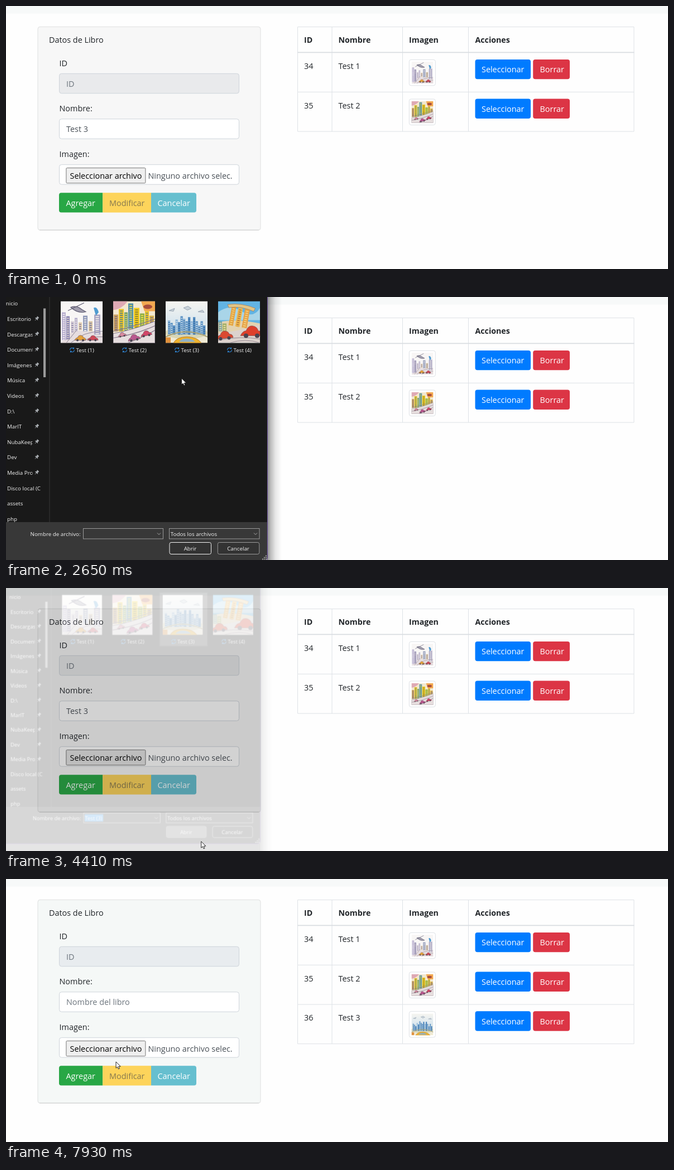
Write an HTML page that moves like this. It is 1186x472 px and loops after 8000 ms.

```html
<!DOCTYPE html>
<html lang="es">
<head>
<meta charset="utf-8">
<style>
html, body { margin: 0; width: 100%; height: 100%; overflow: hidden; background: #fefefe; }
svg { display: block; }
text { font: 14.4px "Open Sans", "Noto Sans", sans-serif; fill: #212529; white-space: pre; }
.head { font-weight: 700; font-size: 14.2px; }
.soft { fill: #6c757d; }
.field { fill: #495057; }
.w { fill: #fff; }
.small text { font-size: 9.8px; fill: #f2f2f2; }
</style>
</head>
<body>
<svg id="stage" width="100%" height="100%" viewBox="0 0 1186 472"></svg>
<script>
const LOOP = 8000;
const OPEN = 2050, CLOSE = 4250, PICKED = 4480, CLICK = 5980, SAVED = 6250;

const rect = (x, y, w, h, fill, more = '') =>
  `<rect x="${x}" y="${y}" width="${w}" height="${h}" fill="${fill}" ${more}/>`;
const text = (x, y, s, cls = '', more = '') =>
  `<text x="${x}" y="${y}" class="${cls}" ${more}>${s}</text>`;
const path = (d, stroke, width = 1, fill = 'none', more = '') =>
  `<path d="${d}" stroke="${stroke}" stroke-width="${width}" fill="${fill}" ${more}/>`;
const group = (id, body, more = '') => `<g id="${id}" ${more}>${body}</g>`;
const pic = (n, x, y, size) => `<use href="#pic${n}" x="${x}" y="${y}" width="${size}" height="${size}"/>`;

// City drawings, each in a 75 unit square
const tower = (x, y, w, h, fill, win) =>
  rect(x, y, w, h, fill) +
  path(`M${x + w / 2} ${y + 3}V${y + h}`, win, w * 0.55, 'none', 'stroke-dasharray="1.6 2.2"');
const car = (x, y, w, fill) =>
  path(`M${x} ${y}q${w * .1}-${w * .22} ${w * .25}-${w * .22}q${w * .1}-${w * .25} ${w * .3}-${w * .22}t${w * .25} ${w * .22}q${w * .2} 0 ${w * .2} ${w * .22}z`, '#6a4a52', .6, fill) +
  `<circle cx="${x + w * .25}" cy="${y}" r="${w * .1}" fill="#4a4450"/><circle cx="${x + w * .75}" cy="${y}" r="${w * .1}" fill="#4a4450"/>`;
const tilt = (deg, body) => `<g transform="rotate(${deg} 37 37)">${body}</g>`;

const drawings = [
  rect(0, 0, 75, 75, '#f8f6f5') +
  path('M0 75L22 52L75 56V75z', 'none', 0, '#e6dddf') +
  tower(2, 20, 7, 50, '#b9b0cf', '#f3eef2') + tower(10, 27, 6, 42, '#8b85b3', '#efe3d0') +
  tower(18, 36, 6, 20, '#d9d0d8', '#8f88ab') + tower(25, 30, 5, 24, '#b5aecb', '#f5eee6') +
  tower(32, 38, 6, 14, '#e3cfae', '#857fa6') +
  tower(40, 26, 8, 28, '#8f99b8', '#f2efee') + tower(50, 36, 7, 18, '#d8c3a2', '#7e7fa3') +
  tower(60, 24, 11, 36, '#aaa6c4', '#f7f2ec') +
  path('M13 17L42 3M18 11q10-4 20 4l7 4q-14 4-27-8z', '#5d5a70', 1.2, '#a29fae') +
  path('M59 12q6-3 9 8l-5 6z', 'none', 0, '#4f9bd0') +
  path('M10 75L30 50M18 75Q40 54 75 54M34 75Q54 62 75 64', '#8e8494', 1) +
  car(25, 70, 20, '#e3a23c') + car(48, 70, 19, '#cf4a5a'),

  rect(0, 0, 75, 75, '#f3e8cf') + path('M0 0H26Q16 14 0 16z', 'none', 0, '#dfa9b4') +
  path('M50 0H75V18H56z', 'none', 0, '#f2a850') +
  tower(1, 24, 8, 30, '#c9a05f', '#7a6c80') + tower(10, 14, 9, 40, '#e8c326', '#55808f') +
  tower(20, 20, 6, 34, '#73a06c', '#e8dc7a') +
  tower(27, 4, 9, 46, '#4f8fa8', '#e8d446') + tower(37, 12, 10, 36, '#f0cb1e', '#837832') +
  tower(48, 22, 8, 26, '#8fb043', '#f3dd53') + tower(57, 18, 7, 28, '#e9c522', '#6b7c94') +
  tower(65, 26, 8, 18, '#d3b04a', '#7b6a86') +
  '<ellipse cx="62" cy="10" rx="8" ry="4" fill="#a84d3c"/>' +
  path('M0 58Q34 52 75 36V75H0z', '#7f7488', 1, '#e6dede') +
  path('M0 54Q35 46 75 32M0 66Q40 60 75 44M26 75Q52 66 75 52', '#84768a', 1.2) +
  tilt(-12, car(4, 58, 15, '#d98aa0') + car(20, 69, 22, '#b9578f') + car(44, 66, 20, '#d24568')),

  rect(0, 0, 75, 75, 'url(#haze)') +
  path('M6 17l10-4l-2 5zM32 12l8-3l6 4l-7 3zM58 19l8-3l3 4z', '#8795a5', .8, '#c9d3da') +
  '<ellipse cx="37" cy="57" rx="38" ry="11" fill="#d9d6b4"/>' +
  Array.from({ length: 15 }, (_, i) => {
    const top = 24 + (i * 7 % 5) * 3 + Math.abs(i - 7) * 1.5;
    return tower(4 + i * 4.5, top, 4.3, 60 - top, i % 3 ? '#5b91c3' : '#8db5d8', i % 2 ? '#cfe1ee' : '#2f679f');
  }).join('') +
  path('M0 64Q36 46 75 64', '#a7a073', 2) +
  path('M14 75q6-11 24-11t26 11z', '#b67b25', 1, '#eeb22e') +
  path('M24 73q4-6 14-6t15 6z', 'none', 0, '#8fb0c4') + rect(0, 65, 9, 10, '#e0913d'),

  rect(0, 0, 75, 75, '#62b4e3') + path('M0 20Q20 4 42 18T75 12V34H0z', 'none', 0, '#a9d5e8') +
  path('M0 38Q30 30 75 40V75H0z', 'none', 0, '#e3d3b0') +
  tilt(10, tower(20, 12, 8, 34, '#e3a241', '#f6d378') + tower(32, 12, 8, 34, '#efb94d', '#b5763b') +
    tower(44, 12, 9, 34, '#e6a145', '#f4d586') +
    path('M12 10Q36 2 62 8L60 14Q36 8 15 15z', '#9b704c', .6, '#e2c585')) +
  tower(1, 36, 6, 18, '#7fa6a4', '#e7d8a2') + tower(8, 40, 7, 14, '#a5b06a', '#efe0a4') +
  path('M0 58Q36 54 75 42V75H0z', 'none', 0, '#dcd2cd') +
  path('M0 70Q40 62 75 68M20 75Q50 66 75 75', '#948790', 1) +
  tilt(-6, car(-6, 64, 30, '#db4a31')) + car(40, 62, 40, '#dd3f2b')
];

const defs = '<defs>' +
  '<linearGradient id="haze" x2="0" y2="1"><stop stop-color="#f6f5f0"/><stop offset=".45" stop-color="#dce8ef"/><stop offset="1" stop-color="#f2ead0"/></linearGradient>' +
  '<linearGradient id="shade"><stop stop-color="#000" stop-opacity=".5"/><stop offset=".3" stop-color="#000" stop-opacity=".25"/><stop offset=".6" stop-color="#000" stop-opacity=".09"/><stop offset="1" stop-color="#000" stop-opacity="0"/></linearGradient>' +
  drawings.map((d, i) => `<symbol id="pic${i + 1}" viewBox="0 0 75 75">${d}</symbol>`).join('') +
  '</defs>';

// Page
const input = (y, id, fill) => rect(95.5, y, 322, 35.5, fill, `id="${id}" rx="4" stroke="#ced4da"`);

const form =
  rect(57, 37.3, 399, 365, '#f7f7f7', 'id="card" rx="4" stroke="#dedfdf"') +
  path('M60 402H453', '#cfd0d0') +
  text(77, 66, 'Datos de Libro') +
  text(95.5, 107.5, 'ID') + input(121.3, 'idBox', '#e9eaec') + text(108, 145, 'ID', 'soft') +
  text(95.5, 189, 'Nombre:') + input(202.8, 'nameBox', '#fff') + text(108, 226, '', 'field', 'id="name"') +
  text(95.5, 271, 'Imagen:') + input(284.7, 'fileBox', '#fff') +
  rect(107.9, 290.6, 142, 27.3, '#efefef', 'id="pick" rx="1.5" stroke="#767676"') +
  text(114.5, 310, 'Seleccionar archivo', '', 'style="fill:#000"') +
  text(254.5, 310, '', 'field', 'id="file"') +
  rect(94, 333.7, 80.5, 38.3, 'none', 'id="ring" rx="5" stroke="#93d3a2" stroke-width="3.4"') +
  path('M99 335.2H173.2V370.6H99q-4 0-4-4V339.2q0-4 4-4z', 'none', 0, '#28a745', 'id="add"') +
  rect(173.2, 335.2, 86.8, 35.4, '#fdd45b') +
  path('M260 335.2H337q4 0 4 4V366.6q0 4-4 4H260z', 'none', 0, '#66bfcf') +
  text(107.5, 358.5, 'Agregar', 'w') +
  text(185, 358.5, 'Modificar', '', 'style="fill:#85784f"') +
  text(271.5, 358.5, 'Cancelar', 'w');

const PITCH = 70.7;
const row = i => {
  const y = 83.7 + i * PITCH, v = `${y}v${PITCH}`;
  return path(`M522.5 ${y + PITCH}H1125M522.5 ${v}M584 ${v}M710.5 ${v}M828.5 ${v}M1125 ${v}`, '#dee2e6') +
    text(534, y + 29.3, 34 + i) + text(595.5, y + 29.3, 'Test ' + (i + 1)) +
    rect(722.3, y + 12.6, 47, 46.5, '#fff', 'rx="3.5" stroke="#dee2e6"') + pic(i + 1, 726.5, y + 16.3, 39) +
    rect(840.5, y + 12.2, 99.5, 35.4, '#007bff', 'rx="4"') + text(852, y + 35.4, 'Seleccionar', 'w') +
    rect(944.2, y + 12.2, 65.8, 35.4, '#dc3545', 'rx="4"') + text(956.5, y + 35.4, 'Borrar', 'w');
};

const table =
  path('M522.5 83.5V37.5H1125V83.5M584 37.5v46M710.5 37.5v46M828.5 37.5v46', '#dee2e6') +
  ['ID', 'Nombre', 'Imagen', 'Acciones'].map((s, i) => text([534, 595.5, 722, 840.5][i], 66, s, 'head')).join('') +
  row(0) + row(1) + group('newRow', row(2)) + path('M522 83.4H1125.5', '#d9dde1', 1.8);

// File dialog
const pinned = ['Escritorio', 'Descargas', 'Documentos', 'Imágenes', 'Música', 'Videos', 'D:\\', 'MarlT', 'NubaKeep', 'Dev', 'Media Proyectos'];
const plain = ['Disco local (C:)', 'assets', 'php'];
const itemY = i => 43 + i * 27.6;
const clip = (w, body) => `<svg width="${w}" height="404" overflow="hidden">${body}</svg>`;
const pin = i => path('M-2.3-4.5h4.6l-.7 1.2v2.4l1.7 1.7h-6.6l1.7-1.7v-2.4zM0 .8V5', '#a9adb2', 1, '#a9adb2',
  `transform="translate(55 ${itemY(i) - 4}) rotate(42) scale(.85)"`);
const side =
  clip(62, text(-3, 15, 'Inicio') + plain.map((s, i) => text(2, itemY(i + 11), s)).join('')) +
  clip(47.5, pinned.map((s, i) => text(2, itemY(i), s)).join('')) +
  pinned.map((s, i) => pin(i)).join('');

const sync = (x, y) => path(`M${x - 4} ${y}a4 4 0 0 1 7-2.4v-2M${x + 3} ${y - 2.4}h-2M${x + 4} ${y}a4 4 0 0 1-7 2.4v2M${x - 3} ${y + 2.4}h2`, '#2f86d6', 1.1);
const tiles = rect(280.5, 3.5, 89, 100, '#777', 'id="tile"') +
  [0, 1, 2, 3].map(i => pic(i + 1, 98 + i * 94, 7.5, 75) + sync(118.5 + i * 94, 95) +
    text(125.5 + i * 94, 98.5, `Test (${i + 1})`)).join('');

const arrow = (x, y) => path(`M${x} ${y}l3 3l3-3`, '#b5b5b5', .9);
const button = (x, stroke, id) => rect(x, 440.5, 74.5, 21, '#333', `id="${id}" rx="3" stroke="${stroke}"`);
const controls =
  text(43.5, 428.5, 'Nombre de archivo:') +
  rect(138.5, 415.5, 143, 18.5, '#383838', 'stroke="#9b9b9b"') + arrow(271, 423.5) +
  rect(140.5, 418, 34.5, 13.5, '#3393e8', 'id="mark"') +
  text(141, 428.5, 'Test (3)', '', 'id="picked"') +
  rect(292.5, 415.5, 161.5, 18.5, '#383838', 'stroke="#9b9b9b"') + arrow(444, 423.5) +
  text(294.8, 428.5, 'Todos los archivos') +
  button(293, '#f4f4f4', 'openBtn') + text(330, 454.8, 'Abrir', '', 'text-anchor="middle"') +
  button(379.3, '#9b9b9b', 'noBtn') + text(416, 454.8, 'Cancelar', '', 'text-anchor="middle"') +
  path('M465 464.5h2M462 467.5h5M459 470.5h8', '#c8c8c8', 1.6, 'none', 'stroke-dasharray="1.8 1.2"');

const blanks = [[43, 418, 91, 13], [138, 415, 144, 19], [292, 415, 162, 19], [292, 440, 76, 22], [379, 440, 75, 22], [454, 458, 14, 14]]
  .map(b => rect(...b, '#fff')).join('');

const dialog =
  rect(466, -40, 28, 540, 'url(#shade)') + rect(-40, 460, 506, 40, '#000', 'opacity=".5"') +
  path('M-40-40H468.4V466.5q0 7-7 7H-40z', '#6f52a5', 1, '#383838') +
  rect(-40, -40, 507.8, 444, '#191919') +
  group('empty', rect(76, -40, 392, 444, '#fefefe') + blanks) +
  group('bar', controls) +
  group('list', path('M78-40V404', '#333', 1.2) + side) +
  group('tiles', tiles) +
  rect(67, 51, 4.2, 82, '#9a9a9a', 'id="thumb"');

const pointer =
  path('M0 0V11.4L2.6 9L4.4 13L6.3 12.2L4.6 8.3H8.2Z', '#111', .9, '#fff', 'id="arrow"') +
  path('M-1.2 1.2Q0-.8 1.2 1.2V6Q3 5 3.6 6.6Q5 6 5.6 7.4Q7 7 7.4 8.6V11Q7 14 5.6 16H-.6L-4 10.5Q-4.4 8.6-2.6 9L-1.2 10.2Z', '#222', .9, '#fff', 'id="hand"') +
  '<circle id="busy" cx="9" cy="0" r="4" fill="none" stroke="#1c9be6" stroke-width="2.8" stroke-dasharray="21 4.1"/>';

document.getElementById('stage').innerHTML = defs +
  rect(0, 0, 1186, 472, '#fefefe') + rect(0, 0, 1186, 13.5, '#f7f9f9') +
  form + table + group('dialog', dialog, 'class="small"') + group('cursor', pointer);

// Motion
const el = {};
document.querySelectorAll('#stage [id]').forEach(e => el[e.id] = e);
const show = (id, on) => el[id].style.display = on ? '' : 'none';
const fill = (id, c) => el[id].setAttribute('fill', c);
const clamp = v => Math.max(0, Math.min(1, v));

// time, x, y
const track = [
  [380, 541, 404], [720, 330, 340], [1000, 190, 309], [1150, 150, 305], [1400, 150, 306],
  [1700, 257, 304], [1980, 343, 212], [2250, 307, 244], [2550, 310, 180], [2900, 326, 62],
  [3130, 328, 60], [3390, 351, 353], [3670, 353, 418], [3950, 351, 455], [4290, 352, 456],
  [4610, 346, 453], [4950, 260, 400], [5380, 151, 353], [5450, 146, 352], [5650, 119, 353],
  [6400, 119, 353], [6730, 130, 355], [7100, 235, 374], [7470, 322, 385], [7600, 322, 385], [7930, 197, 328]
];
function cursorAt(t) {
  const i = track.findIndex(k => k[0] > t);
  if (i < 0) return track[track.length - 1].slice(1);
  if (i === 0) return track[0].slice(1);
  const [t0, x0, y0] = track[i - 1], [t1, x1, y1] = track[i];
  const k = (t - t0) / (t1 - t0);
  return [x0 + (x1 - x0) * k, y0 + (y1 - y0) * k];
}

function draw(t) {
  const [x, y] = cursorAt(t);
  const onAdd = t > PICKED && x > 95 && x < 173 && y > 335 && y < 370;
  const ring = t >= CLICK && t < SAVED;
  const saved = t >= SAVED;

  show('cursor', t >= 380);
  el.cursor.setAttribute('transform', `translate(${x.toFixed(2)} ${y.toFixed(2)})`);
  show('hand', onAdd);
  show('arrow', !onAdd);
  show('busy', t >= 1400 && t < OPEN);
  el.busy.setAttribute('transform', `rotate(${((t - 1700) * .36 + 560) % 360} 9 0)`);

  const cool = t >= PICKED;
  fill('card', cool ? '#f5f8f7' : '#f7f7f7');
  fill('idBox', cool ? '#e8ecef' : '#e9eaec');
  fill('pick', t > 1000 && t < PICKED ? '#e5e5e5' : '#efefef');
  fill('add', ring ? '#1e7e34' : onAdd ? '#218838' : '#28a745');
  show('ring', ring);
  el.name.textContent = saved ? 'Nombre del libro' : 'Test 3';
  el.name.setAttribute('class', saved ? 'soft' : 'field');
  el.file.textContent = cool && !saved ? 'Test (3).png' : 'Ninguno archivo selec.';
  show('newRow', saved);

  const rise = clamp((t - OPEN) / 180), fall = clamp((t - CLOSE) / 200);
  const grow = 1 - .07 * (1 - rise) ** 3 - .05 * fall;
  show('dialog', t >= OPEN && fall < 1);
  el.dialog.setAttribute('opacity', rise * (1 - fall));
  el.dialog.setAttribute('transform', `translate(150 120) scale(${grow}) translate(-150 -120)`);
  const loaded = t >= 2400;
  show('empty', !loaded);
  show('bar', loaded);
  show('list', loaded);
  show('tiles', t >= 2520);
  el.thumb.setAttribute('y', loaded ? 20.5 : 51);
  el.thumb.setAttribute('height', loaded ? 123.5 : 82);

  const chosen = t >= 3050, pressed = t >= 4150, onOpen = t >= 3850;
  show('tile', t >= 2850);
  fill('tile', pressed ? '#434343' : chosen ? '#777' : '#4d4d4d');
  show('picked', chosen);
  show('mark', pressed);
  fill('openBtn', onOpen ? '#727272' : '#333');
  el.openBtn.setAttribute('stroke', onOpen ? '#8c8c8c' : '#f4f4f4');
}

const start = performance.now();
function tick() {
  draw((performance.now() - start) % LOOP);
  requestAnimationFrame(tick);
}
draw(0);
requestAnimationFrame(tick);
</script>
</body>
</html>
```
